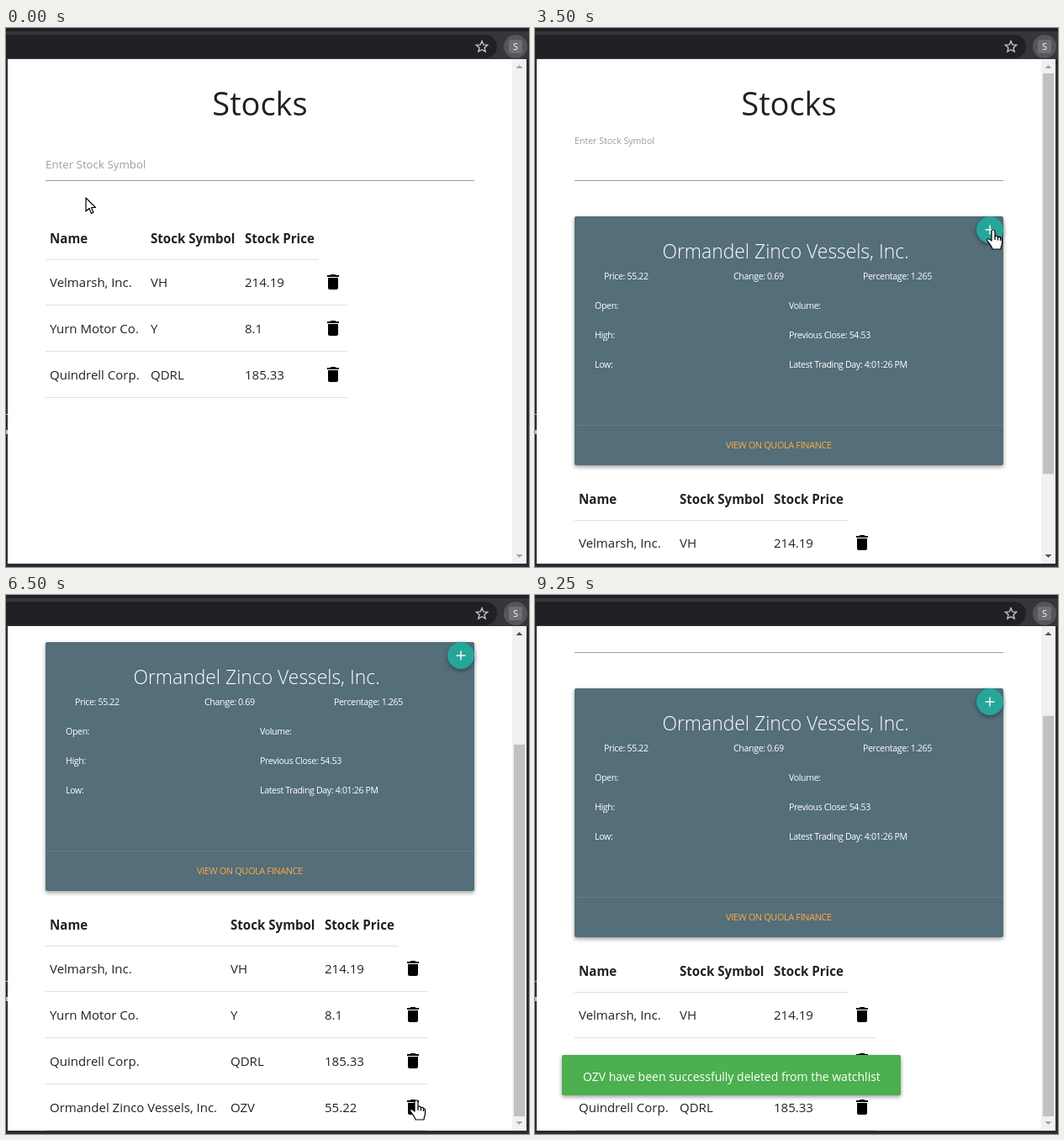
Write an HTML page with a canvas that moves like this. It is 622 by 641 pixels and loops after 9750 ms.

```html
<!DOCTYPE html>
<html lang="en">
<head>
<meta charset="utf-8">
<title>Stocks</title>
<style>
  html, body { margin: 0; width: 100%; height: 100%; overflow: hidden; background: #2b2c30; }
  canvas { display: block; }
</style>
</head>
<body>
<canvas id="stage" width="622" height="641"></canvas>
<script>
const ctx = document.getElementById('stage').getContext('2d');
const LOOP = 9750, STEP = 250;
const INK = 'rgba(0,0,0,.87)', GREY = '#9e9e9e', TEAL = '#26a69a';

const COMPANY = 'Ormandel Zinco Vessels';
const STOCKS = [
  ['Velmarsh, Inc.', 'VH', '214.19'],
  ['Yurn Motor Co.', 'Y', '8.1'],
  ['Quindrell Corp.', 'QDRL', '185.33'],
  [COMPANY + ', Inc.', 'OZV', '55.22'],
];

const TRASH = new Path2D('M6 19c0 1.1.9 2 2 2h8c1.1 0 2-.9 2-2V7H6v12zM19 4h-3.5l-1-1h-5l-1 1H5v2h14V4z');
const POINTERS = {
  arrow: new Path2D('M0 0V16L4 12.5L6.5 18.5L9 17.5L6.5 11.5H11.5Z'),
  hand: new Path2D('M-2 2C-2-1 2-1 2 2V8C3 6.5 5 7 5.5 9C7 7.5 8.5 8.5 8.5 10C10 9.5 10.5 10.5 10.5 12V16C10.5 18 9 20 9 23H-1C-1.5 20-5 16-7 13C-8.5 10.5-5.5 9.5-2 13Z'),
  beam: new Path2D('M-3-8H3M0-8V8M-3 8H3'),
};
const KNUCKLES = new Path2D('M2 8V12M5.5 9V12.5M8.5 10V13');

// Pointer keys: step, x, y, shape
const MOVES = [
  [0, 95, 202, 'arrow'], [1, 120, 162, 'beam'], [7, 120, 162, 'beam'], [8, 160, 188, 'hand'],
  [9, 171, 186, 'hand'], [11, 171, 186, 'hand'], [12, 290, 210, 'arrow'], [14, 545, 240, 'hand'],
  [15, 545, 240, 'hand'], [16, 520, 290, 'arrow'], [18, 486, 331, 'arrow'], [21, 486, 350, 'arrow'],
  [25, 488, 598, 'hand'], [26, 488, 601, 'hand'], [27, 488, 601, 'hand'], [28, 482, 450, 'arrow'],
  [30, 463, 205, 'hand'], [32, 463, 205, 'hand'], [33, 490, 170, 'arrow'], [35, 585, 60, 'arrow'],
  [36, 700, -40, 'arrow'],
];

const clamp = (v, lo, hi) => Math.min(hi, Math.max(lo, v));

function text(str, x, y, size, color = INK, weight = 400, align = 'left', spacing = 0) {
  ctx.font = `${weight} ${size}px "Open Sans", "Noto Sans", sans-serif`;
  ctx.letterSpacing = spacing + 'px';
  ctx.textAlign = align;
  ctx.fillStyle = color;
  ctx.fillText(str, x, y);
}

function rect(x, y, w, h, color) {
  ctx.fillStyle = color;
  ctx.fillRect(x, y, w, h);
}

function box(x, y, w, h, color, radius = 2, blur = 0, drop = 2) {
  ctx.save();
  if (blur) {
    ctx.shadowColor = 'rgba(0,0,0,.4)';
    ctx.shadowBlur = blur;
    ctx.shadowOffsetY = drop;
  }
  ctx.fillStyle = color;
  ctx.beginPath();
  ctx.roundRect(x, y, w, h, radius);
  ctx.fill();
  ctx.restore();
}

function drawBrowser() {
  rect(0, 0, 622, 641, '#2b2c30');
  rect(0, 0, 622, 4, '#202124');
  rect(0, 4, 622, 33, '#35363a');
  box(-20, 8, 604, 28, '#202124', 14);
  ctx.beginPath();
  for (let i = 0; i < 10; i++) {
    const a = i * Math.PI / 5 - Math.PI / 2, r = i % 2 ? 3.2 : 7;
    ctx.lineTo(566 + r * Math.cos(a), 22.5 + r * Math.sin(a));
  }
  ctx.closePath();
  ctx.strokeStyle = '#c4c6ca';
  ctx.lineWidth = 1.4;
  ctx.stroke();
  box(592, 8, 28, 28, '#55565a', 14);
  box(598, 14, 16, 16, '#6f7073', 2);
  text('S', 606, 26, 11, '#fff', 400, 'center');
  rect(0, 459, 2, 1, '#bbb');
  rect(0, 478, 2, 5, '#bbb');
  rect(2, 37, 617, 600, '#fff');
}

function drawForm(step) {
  const focused = step >= 2 && step < 12;
  text('Stocks', 302, 104, 38, INK, 400, 'center');
  if (step < 2) text('Enter Stock Symbol', 47, 167, 13.3, GREY);
  else text('Enter Stock Symbol', 47, 138, 10.6, GREY);
  if (step < 12) text('ozv'.slice(0, clamp(step - 2, 0, 3)), 47, 166, 15, '#000');
  rect(47, 181, 510, 1, focused ? TEAL : GREY);
}

function drawCard() {
  const small = (str, x, y) => text(str, x, y, 10.6, '#fff', 400, 'left', -.35);
  box(47, 224, 510, 296, '#546e7a', 2, 5);
  text(COMPANY + ', Inc.', 298, 274, 22.9, '#fff', 300, 'center');
  small('Price: 55.22', 82, 299);
  small('Change: 0.69', 236, 299);
  small('Percentage: 1.265', 390, 299);
  ['Open:', 'High:', 'Low:'].forEach((s, i) => small(s, 71, 334 + i * 35));
  ['Volume:', 'Previous Close: 54.53', 'Latest Trading Day: 4:01:26 PM']
    .forEach((s, i) => small(s, 302, 334 + i * 35));
  rect(47, 472, 510, 1, '#657d87');
  text('VIEW ON QUOLA FINANCE', 227, 500, 10.9, '#ffab40', 400, 'left', -.35);
  box(525, 224, 32, 32, TEAL, 16, 5);
  rect(535.5, 239.3, 11, 1.4, '#fff');
  rect(540.3, 234.5, 1.4, 11, '#fff');
}

function drawTable(top, count) {
  const shift = count > 3 ? 95 : 0;
  const cols = [52, 172 + shift, 284 + shift];
  ['Name', 'Stock Symbol', 'Stock Price'].forEach((s, i) => text(s, cols[i], top + 256, 15.1, INK, 700));
  rect(47, top + 275, 325 + shift, 1, '#e0e0e0');
  STOCKS.slice(0, count).forEach((stock, i) => {
    const y = top + 303 + i * 55;
    stock.forEach((s, c) => text(s, cols[c], y + 5, 15));
    rect(47, y + 26, 359 + shift, 1, '#e0e0e0');
    ctx.save();
    ctx.translate(377 + shift, y - 13);
    ctx.fillStyle = '#000';
    ctx.fill(TRASH);
    ctx.restore();
  });
}

function drawSuggestion(step) {
  if (step < 7 || step > 11) return;
  const grow = step === 7 || step === 11 ? .5 : 1;
  ctx.save();
  ctx.globalAlpha = grow;
  ctx.translate(47, 182);
  ctx.scale(1, grow);
  box(0, 0, 510, 50, step < 9 ? '#fff' : '#eee', 1, 4, 1);
  text('OZV', 16, 31, 15.3, '#444');
  text(`(${COMPANY} Inc.)`, 57, 31, 15.3, TEAL);
  ctx.restore();
}

function drawScrollbar(scroll, content) {
  const range = content - 600;
  const arrow = (y, dir, active) => {
    ctx.fillStyle = active ? '#505050' : '#a3a3a3';
    ctx.beginPath();
    ctx.moveTo(606.5, y + 2 * dir);
    ctx.lineTo(614.5, y + 2 * dir);
    ctx.lineTo(610.5, y - 2 * dir);
    ctx.fill();
  };
  rect(602, 37, 17, 600, '#f1f1f1');
  if (range > 0) rect(604, 54 + scroll * 566 / content, 13, 600 * 566 / content, '#c1c1c1');
  arrow(46, 1, scroll > 0);
  arrow(628, -1, scroll < range);
}

function drawToast(message, width, alpha, dy) {
  ctx.save();
  ctx.globalAlpha = alpha;
  ctx.translate(0, dy);
  box(32, 547, width, 48, '#4caf50', 2, 5);
  text(message, 57, 578, 14, '#fff');
  ctx.restore();
}

function drawModal(open) {
  if (!open) return;
  ctx.save();
  rect(2, 37, 600, 600, `rgba(0,0,0,${open / 2})`);
  ctx.globalAlpha = open;
  ctx.translate(302, 173 - 36 * (1 - open));
  ctx.scale(.8 + open * .2, .8 + open * .2);
  box(-240, -76, 480, 152, '#fafafa', 2, 40, 22);
  text('Delete Stock From WatchList?', -216, -23, 30.2, INK);
  text('YES', 140, 53, 13.5, '#343434');
  text('NO', 197, 53, 13.5, '#343434');
  ctx.restore();
}

function drawPointer(step) {
  const i = MOVES.findLastIndex(m => m[0] <= step);
  const [s0, x0, y0, shape] = MOVES[i];
  const [s1, x1, y1] = MOVES[i + 1] || [s0 + 1, x0, y0];
  const k = Math.min(1, (step - s0) / (s1 - s0));
  ctx.save();
  ctx.translate(x0 + (x1 - x0) * k, y0 + (y1 - y0) * k);
  ctx.lineWidth = 1.2;
  ctx.lineJoin = 'round';
  ctx.strokeStyle = '#000';
  ctx.fillStyle = '#fff';
  if (shape !== 'beam') ctx.fill(POINTERS[shape]);
  ctx.stroke(POINTERS[shape]);
  if (shape === 'hand') ctx.stroke(KNUCKLES);
  ctx.restore();
}

function draw(step) {
  const hasCard = step >= 12;
  const count = step >= 15 && step < 33 ? 4 : 3;
  const scroll = step >= 33 ? 113 : [0, 40, 105, 150, 168][clamp(step - 16, 0, 4)];

  drawBrowser();
  ctx.save();
  ctx.beginPath();
  ctx.rect(2, 37, 617, 600);
  ctx.clip();

  ctx.save();
  ctx.translate(0, -scroll);
  drawForm(step);
  if (hasCard) drawCard();
  drawTable(hasCard ? 310 : 0, count);
  drawSuggestion(step);
  ctx.restore();

  if (step >= 15 && step < 25) {
    const alpha = step === 15 || step === 24 ? .5 : 1;
    drawToast('OZV have been successfully added to the watchlist', 378, alpha, step === 15 ? 17 : step === 24 ? -20 : 0);
  }
  if (step >= 33) {
    drawToast('OZV have been successfully deleted from the watchlist', 403, step === 33 ? .5 : 1, step === 33 ? 17 : 0);
  }
  drawModal(step < 27 || step > 31 ? 0 : step === 27 || step === 31 ? .5 : 1);
  drawScrollbar(scroll, !hasCard ? 600 : count > 3 ? 768 : 713);
  ctx.restore();
  drawPointer(step);
}

function tick() {
  draw(Math.floor(performance.now() % LOOP / STEP));
  requestAnimationFrame(tick);
}
tick();
</script>
</body>
</html>
```
